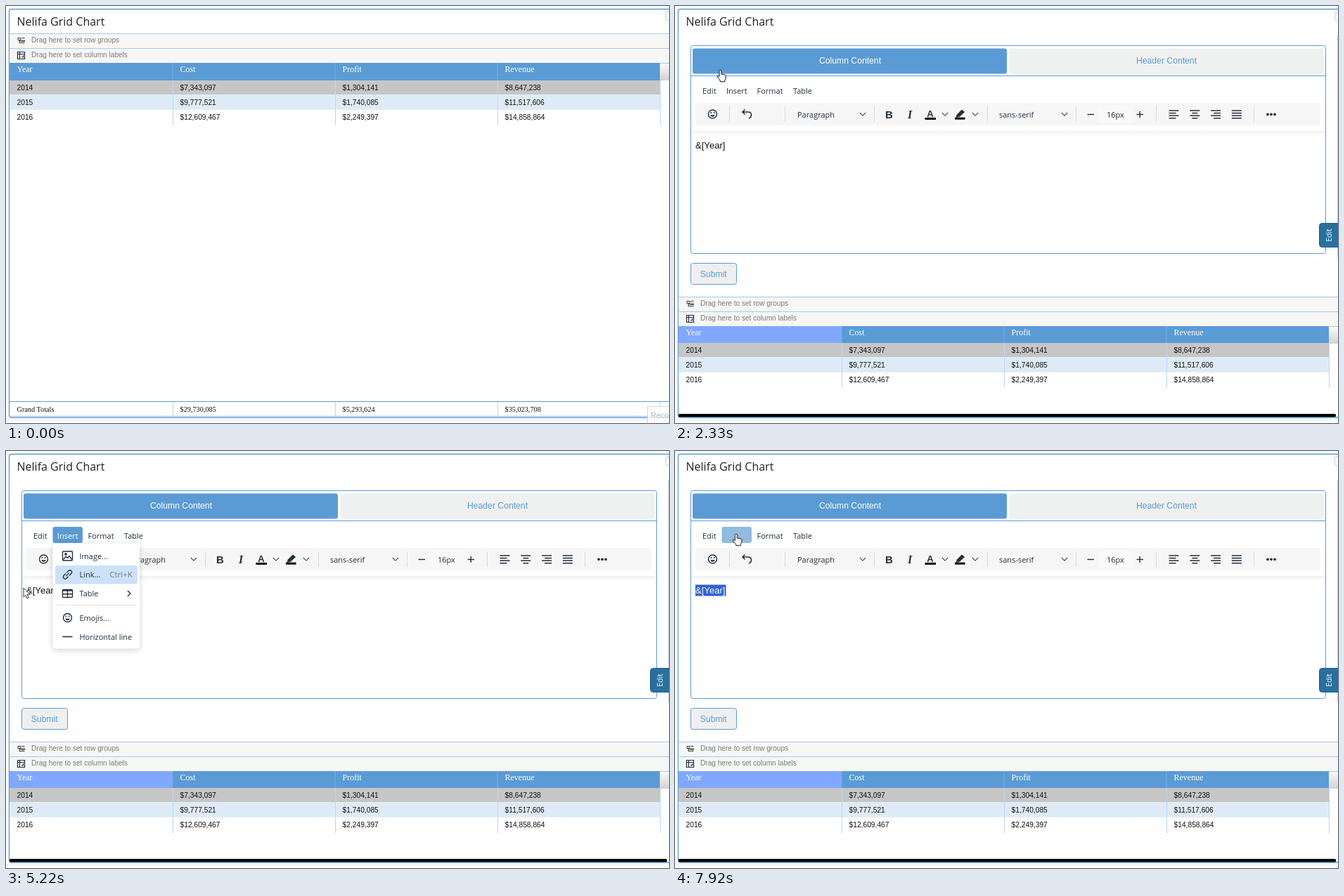
Write an HTML page that moves like this. It is 943 px wide and 594 px high and loops after 7990 ms.

```html
<!DOCTYPE html>
<html lang="en">
<head>
<meta charset="utf-8">
<title>Grid chart editor</title>
<style>
  html, body { margin: 0; width: 100%; height: 100%; overflow: hidden; background: #fefefe; }
  svg { display: block; width: 943px; height: 594px; }
  text { white-space: pre; }
  .arial { font-family: "Liberation Sans", Arial, sans-serif; }
  .times { font-family: "Liberation Serif", "Times New Roman", serif; }
  .ui { font-family: "Open Sans", "Noto Sans", sans-serif; }
  .menu { filter: drop-shadow(0 2px 4px rgba(34, 47, 62, .22)); }
  .icon { fill: none; stroke: #222f3e; stroke-width: 1.4; }
</style>
</head>
<body>
<svg id="stage" viewBox="0 0 943 594" xmlns="http://www.w3.org/2000/svg"></svg>
<script>
const LOOP = 7990;
const BLUE = '#5b9bd5', PALE = '#bdd7ee', INK = '#222f3e';
const COLUMNS = [15.5, 247.5, 478.5, 709.5];
const EDGES = [237, 468, 699, 930];

const rect = (x, y, w, h, fill, more = '') =>
  `<rect x="${x}" y="${y}" width="${w}" height="${h}" fill="${fill}" ${more}/>`;
const line = (x1, y1, x2, y2, color, width = 1) =>
  `<path d="M${x1} ${y1}L${x2} ${y2}" stroke="${color}" stroke-width="${width}"/>`;
const text = (x, y, str, font, size, fill, more = '') =>
  `<text x="${x}" y="${y}" class="${font}" font-size="${size}" fill="${fill}" ${more}>${str}</text>`;
const ui = (x, y, str, fill = INK, more = '') => text(x, y, str, 'ui', 11, fill, more);
// Visible only inside the given pairs of start and end times.
const during = (times, body) => `<g data-show="${times}">${body}</g>`;

const SHAPES = {
  smile: '<circle r="6"/><path d="M-3.3 1.2a3.4 3.4 0 0 0 6.6 0z" fill="#222f3e" stroke="none"/><path d="M-2.2-3v2M2.2-3v2"/>',
  undo: '<path d="M-2.5-6.5L-6-3l3.5 3.5M-6-3H2q4.5 0 4.5 4T3 6" stroke-width="1.6"/>',
  cut: '<path d="M-5-5L3.2 3.2M5-5L-3.2 3.2" stroke-width="1.8"/><circle cx="-4" cy="4" r="1.8"/><circle cx="4" cy="4" r="1.8"/>',
  copy: '<rect x="-2.5" y="-4" width="8" height="10.5" rx="1"/><path d="M-6 4V-6.5H3"/>',
  paste: '<path d="M-2.5 5H-6V-5.5H5V-2M-2.5-7h4.5v3h-4.5z"/><rect x="-1.5" y="-1.5" width="8" height="8.5" rx="1"/>',
  pasteText: '<path d="M-2.5 5H-6V-5.5H5V-2M-2.5-7h4.5v3h-4.5z"/><rect x="-2.5" y="-2" width="9" height="9" rx="1"/><path d="M0 1h4M2 1v4"/>',
  select: '<rect x="-6" y="-6" width="12" height="12" stroke-dasharray="1.6 1.4" stroke-width="1.8"/><rect x="-3" y="-3" width="6" height="6" fill="#222f3e" stroke="none"/>',
  find: '<circle cx="-1.2" cy="-1.2" r="5.2" stroke-width="1.6"/><path d="M2.6 2.6L7 7" stroke-width="2"/>',
  image: '<rect x="-7" y="-6.5" width="14" height="13" rx="1"/><path d="M-6 5l3.5-4L0 3l2.5-3L6 5"/><circle cx="-2.5" cy="-2.5" r="1.2"/>',
  link: '<g transform="rotate(-45)"><path d="M-1 2.8H-4.8a2.8 2.8 0 0 1 0-5.6H-.8M1-2.8H4.8a2.8 2.8 0 0 1 0 5.6H.8M-3 0H3"/></g>',
  table: '<rect x="-7" y="-5.5" width="14" height="11" rx="1"/><path d="M-7-4.5H7" stroke-width="2.2"/><path d="M-7 .8H7M0-5V5"/>',
  rule: '<path d="M-7 0H7" stroke-width="1.6"/>',
  chevron: '<path d="M-4.2-2L0 2.2 4.2-2" stroke-width="1.1"/>',
  pen: '<path d="M-3.5 1L3-5.5l3 2.5L-.5 3l-4 1z" fill="#222f3e"/><path d="M-7 6.2H7.5" stroke="#000" stroke-width="3"/>',
};
const icon = (name, x, y, more = '') =>
  `<g class="icon" transform="translate(${x} ${y})" ${more}>${SHAPES[name]}</g>`;

function gridHead() {
  const bar = (y, label) => rect(5, y, 938, 21, '#f6f6f5') + line(5, y + .5, 943, y + .5, '#a6cbed') +
    text(36, y + 13.2, label, 'arial', 10.1, '#7b7b7b');
  const names = ['Year', 'Cost', 'Profit', 'Revenue'];
  return bar(39, 'Drag here to set row groups') + bar(60, 'Drag here to set column labels') +
    '<path d="M17 45.500h4v3h-4zM22.500 45.500h4M22.500 49h4v1.500h-4zM22.500 52.500h4M19 48.500v4h3.500M19 50h3" fill="none" stroke="#333"/>' +
    '<path d="M16.500 65.500h10v10h-10zM16.500 68.500h10M19.500 65.500v10M22 73h2.500v-3" fill="none" stroke="#222b40" stroke-width="1.2"/>' +
    rect(5, 81, 925, 25, BLUE) + during('2330 7990', rect(5, 81, 232, 25, '#80a8ff')) +
    rect(930, 82, 13, 24, 'url(#gutter)') + line(930, 81.5, 943, 81.5, '#a6cbed') +
    EDGES.slice(0, 3).map(x => line(x, 81, x, 106, '#78aee0')).join('') +
    names.map((n, i) => text(COLUMNS[i], 94, n, 'times', 12, '#fff')).join('') +
    during('1120 2330', [84.5, 88, 91.5].map(y => line(227, y, 237, y, '#fff', 1.6)).join(''));
}

function gridRows() {
  const rows = [
    ['2014', '$7,343,097', '$1,304,141', '$8,647,238'],
    ['2015', '$9,777,521', '$1,740,085', '$11,517,606'],
    ['2016', '$12,609,467', '$2,249,397', '$14,858,864'],
  ];
  const fills = ['#c6c6c6', '#deebf7', '#fefefe'];
  return rows.map((cells, r) => {
    const y = 106 + r * 21;
    return rect(5, y, 925, 21, fills[r]) + line(5, y + 20.5, r < 2 ? 930 : 5, y + 20.5, '#e4eef8') +
      cells.map((c, i) => text(COLUMNS[i], y + 14.3, c, 'arial', 10.25, '#111')).join('');
  }).join('') + EDGES.map(x => line(x + .5, 106, x + .5, 170, PALE)).join('');
}

function totals() {
  const cells = ['Grand Totals', '$29,730,085', '$5,293,624', '$35,023,708'];
  return line(5, 563.5, 943, 563.5, BLUE) + line(5, 584, 943, 584, PALE) +
    EDGES.map(x => line(x + .5, 564, x + .5, 584, PALE)).join('') +
    cells.map((c, i) => text(COLUMNS[i], 577.8, c, 'times', 10.25, '#111')).join('');
}

function toolbar() {
  const align = [[-7, 7, -7, 3], [-7, 7, -4, 4], [-7, 7, -3, 7], [-7, 7, -7, 7]];
  return rect(29, 138, 889, 32, '#f6f6f6', 'rx="3"') +
    [77, 156, 283, 444, 570, 684, 823].map(x => line(x + .5, 143, x + .5, 165, '#d9dadb')).join('') +
    icon('smile', 53.5, 154) + icon('undo', 102, 154) +
    icon('undo', 133, 154, 'style="scale:-1 1;opacity:.45"') +
    ui(174, 158.7, 'Paragraph') + ui(461, 158.7, 'sans-serif') +
    rect(602, 142, 49, 24, '#f9f9f9') + ui(614, 158.7, '16px') +
    [267, 384, 427, 554].map(x => icon('chevron', x, 154, 'opacity=".8"')).join('') +
    text(304.5, 159.5, 'B', 'arial', 15, INK, 'font-weight="700" text-anchor="middle"') +
    text(334, 159.5, 'I', 'times', 16, INK, 'font-style="italic" font-weight="700" text-anchor="middle"') +
    text(363, 158, 'A', 'arial', 13, INK, 'font-weight="700" text-anchor="middle"') +
    line(355.5, 160.5, 371, 160.5, '#000', 3) + icon('pen', 405, 154) +
    line(586.5, 154.5, 596, 154.5, INK, 1.4) + line(656.5, 154.5, 666, 154.5, INK, 1.4) +
    line(661.2, 150, 661.2, 159, INK, 1.4) +
    align.map(([a, b, c, d], i) => [0, 1, 2, 3].map(k => {
      const x = 709.5 + i * 29.8, y = 149 + k * 3.6;
      return k % 2 ? line(x + c, y, x + d, y, INK, 1.5) : line(x + a, y, x + b, y, INK, 1.5);
    }).join('')).join('') +
    [843, 848, 853].map(x => `<circle cx="${x}" cy="154.300" r="1.900" fill="${INK}"/>`).join('');
}

function menuBar() {
  const item = (x, name, fill) => ui(x, 124.5, name, fill);
  const active = (x, w, tx, name) => rect(x, 108, w, 23, BLUE, 'rx="3"') + item(tx, name, '#fff');
  return during('2780 2920', rect(32, 108, 33, 23, '#eff5fb', 'rx="3"')) +
    item(39, 'Edit') + item(73, 'Insert') + item(116.5, 'Format') + item(168, 'Table') +
    during('2780 2920', active(161, 40, 168, 'Table')) +
    during('2920 3130', active(32, 33, 39, 'Edit')) +
    during('3130 7920', active(66.5, 42.5, 73, 'Insert')) +
    during('7920 7990', rect(66.5, 108, 42.5, 23, '#8fbae2', 'rx="3"') + item(73, 'Insert', '#b3bcc5'));
}

function editor() {
  const sample = fill => text(29, 203, '&amp;[Year]', 'arial', 13.1, fill);
  return rect(5, 39, 938, 375, '#fefefe') + line(942.5, 41, 942.5, 358, '#c3c8cc') +
    rect(22.5, 56.5, 903, 296, '#fff', `stroke="${BLUE}" rx="3"`) +
    rect(25, 60.5, 447, 36, BLUE, 'rx="3"') + rect(475.5, 60.5, 447, 36, '#eff0f0', 'rx="3"') +
    line(23, 99.5, 925, 99.5, BLUE) +
    text(249, 82, 'Column Content', 'arial', 12.2, '#fff', 'text-anchor="middle"') +
    text(699, 82, 'Header Content', 'arial', 12.2, BLUE, 'text-anchor="middle"') +
    rect(23, 178, 902, 7, 'url(#fade)') + menuBar() + toolbar() + sample('#111') +
    during('6510 7990', rect(29, 190.5, 43.5, 16, '#2f62cf') + sample('#fff')) +
    rect(22.5, 366.5, 65, 30, '#efefef', `stroke="${BLUE}" rx="3"`) +
    text(54.7, 386, 'Submit', 'arial', 12.2, BLUE, 'text-anchor="middle"') +
    rect(5, 581, 935, 4.5, '#000', 'rx="1.500"');
}

// Items: [centre y, icon, label, shortcut]; an item with only a y is a divider.
function menu(x, w, h, items, under = '') {
  return `<g class="menu">${rect(x, 131.5, w, h, '#fff', 'rx="4"')}</g>` + under +
    items.map(([y, pic, label, key]) => {
      if (!pic) return line(x + 4, y + .5, x + w - 4, y + .5, '#dfe1e4');
      const redo = label === 'Redo';
      return icon(redo ? 'undo' : pic, x + 21, y, redo ? 'style="scale:-1 1;opacity:.5"' : '') +
        ui(x + 38, y + 4.2, label, redo ? '#a0a5ab' : INK) +
        (key ? text(x + w - 10, y + 4.2, key, 'ui', 11.6, '#777d85', 'text-anchor="end"') : '');
    }).join('');
}

const editMenu = menu(32, 181, 245.5, [
  [149.5, 'undo', 'Undo', 'Ctrl+Z'], [176.5, 'undo', 'Redo', 'Ctrl+Y'], [192],
  [211, 'cut', 'Cut', 'Ctrl+X'], [237.5, 'copy', 'Copy', 'Ctrl+C'],
  [264, 'paste', 'Paste', 'Ctrl+V'], [291, 'pasteText', 'Paste as text'], [307],
  [325.5, 'select', 'Select all', 'Ctrl+A'], [342], [360, 'find', 'Find and replace...', 'Ctrl+F'],
]);

const hover = y => rect(70, y, 117, 26.5, '#cce2fa', 'rx="3"');
const insertMenu = menu(66.5, 123.5, 150, [
  [149.5, 'image', 'Image...'], [176, 'link', 'Link...', 'Ctrl+K'], [203, 'table', 'Table'], [219],
  [237.5, 'smile', 'Emojis...'], [264.5, 'rule', 'Horizontal line'],
], during('4080 4560', hover(136)) + during('4560 7110', hover(163))) +
  '<path d="M173 199l4 4-4 4" class="icon"/>';

const cursor = `<g id="cursor">
  ${during('2190 2330', '<circle r="11.300" fill="#b3c75c"/>')}
  ${during('320 1000 5220 5620', '<path d="M0 0V13L3 10.300 5 15 7.200 14 5.200 9.500H9.300z" fill="#fff" stroke="#222" stroke-width=".9"/>')}
  ${during('1000 4760 7250 7990', '<path transform="translate(-4 0)" d="M3 1.700a1.500 1.500 0 0 1 3 0V6l4.800 1q1.400.400 1.400 1.800V12l-1.400 3v1.800H4.200V15L.300 10q-.700-1.700.9-1.900L3 9.500z" fill="#fff" stroke="#111"/>')}
  ${during('4760 5220 5620 7250', '<path d="M-2.500-6H-.800L0-5 .8-6H2.500M0-5V5M-2.500 6H-.800L0 5 .8 6H2.500" fill="none" stroke="#444"/>')}
</g>`;

document.getElementById('stage').innerHTML = `
  <defs>
    <linearGradient id="gutter" x2="0" y2="1"><stop stop-color="#fafafa"/><stop offset="1" stop-color="#d2d2d2"/></linearGradient>
    <linearGradient id="fade" x2="0" y2="1"><stop stop-color="#f0f0f0"/><stop offset="1" stop-color="#fff"/></linearGradient>
  </defs>
  ${rect(0, 587, 943, 4, '#f3f5f7')}
  ${rect(4.5, 4.5, 950, 581.5, '#fefefe', `stroke="${BLUE}" stroke-width="1.300" rx="3"`)}
  ${text(15.5, 28, 'Nelifa Grid Chart', 'ui', 16, '#222')}
  ${rect(938.5, 8.5, 12, 12, '#fff', 'stroke="#ccc" rx="2"')}
  <g id="head">${gridHead()}</g><g id="rows">${gridRows()}</g>
  ${during('0 2330', totals())}
  ${during('0 70', rect(912.5, 570.5, 40, 30, '#fff', 'stroke="#d4d4d4" fill-opacity=".85"') + text(917, 587, 'Record', 'arial', 11, '#b5b5b5'))}
  ${during('2330 7990', editor())}
  ${during('2850 3130', editMenu)}
  ${during('3130 7110', insertMenu)}
  ${during('320 7990', rect(916.5, 309.5, 40, 34, '#28709f', 'stroke="#1f5f8a" rx="4"') +
    text(0, 0, 'Edit', 'ui', 10.5, '#fff', 'text-anchor="middle" transform="translate(933.5 326.500) rotate(-90)"'))}
  ${cursor}`;

const run = (el, frames) => el.animate(frames, { duration: LOOP, iterations: Infinity });
const at = (ms, props, easing = 'step-end') => ({ offset: ms / LOOP, easing, ...props });

for (const el of document.querySelectorAll('[data-show]')) {
  const times = el.dataset.show.split(' ').map(Number);
  const frames = times.map((ms, i) => at(ms, { opacity: i % 2 ? 0 : 1 }));
  if (times[0] > 0) frames.unshift(at(0, { opacity: 0 }));
  if (times[times.length - 1] < LOOP) frames.push(at(LOOP, { opacity: 0 }));
  run(el, frames);
}

const move = (x, y) => ({ transform: `translate(${x}px, ${y}px)` });
for (const [id, dy] of [['head', 375], ['rows', 374]]) {
  run(document.getElementById(id), [at(0, move(0, 0)), at(2330, move(0, dy)), at(LOOP, move(0, dy))]);
}

const path = [
  [0, 925, 560], [320, 925, 560], [1050, 64, 91], [2779, 64, 91], [2780, 170, 122], [2849, 170, 122],
  [2850, 43, 131], [2919, 43, 131], [3130, 76, 124], [3420, 65, 130], [3619, 65, 130], [3690, 71, 130],
  [3950, 71, 130], [4290, 95, 152], [4490, 95, 152], [4620, 90, 172], [4830, 37.5, 200], [5219, 37.5, 200],
  [5220, 25, 195], [5289, 25, 195], [5290, 10, 194], [5490, 10, 194], [5970, 31, 200],
  [6440, 31, 200], [6710, 84, 192], [7180, 84, 192], [7860, 86.5, 118], [LOOP, 86.5, 118],
];
run(document.getElementById('cursor'), path.map(([ms, x, y]) => at(ms, move(x, y), 'linear')));
</script>
</body>
</html>
```
